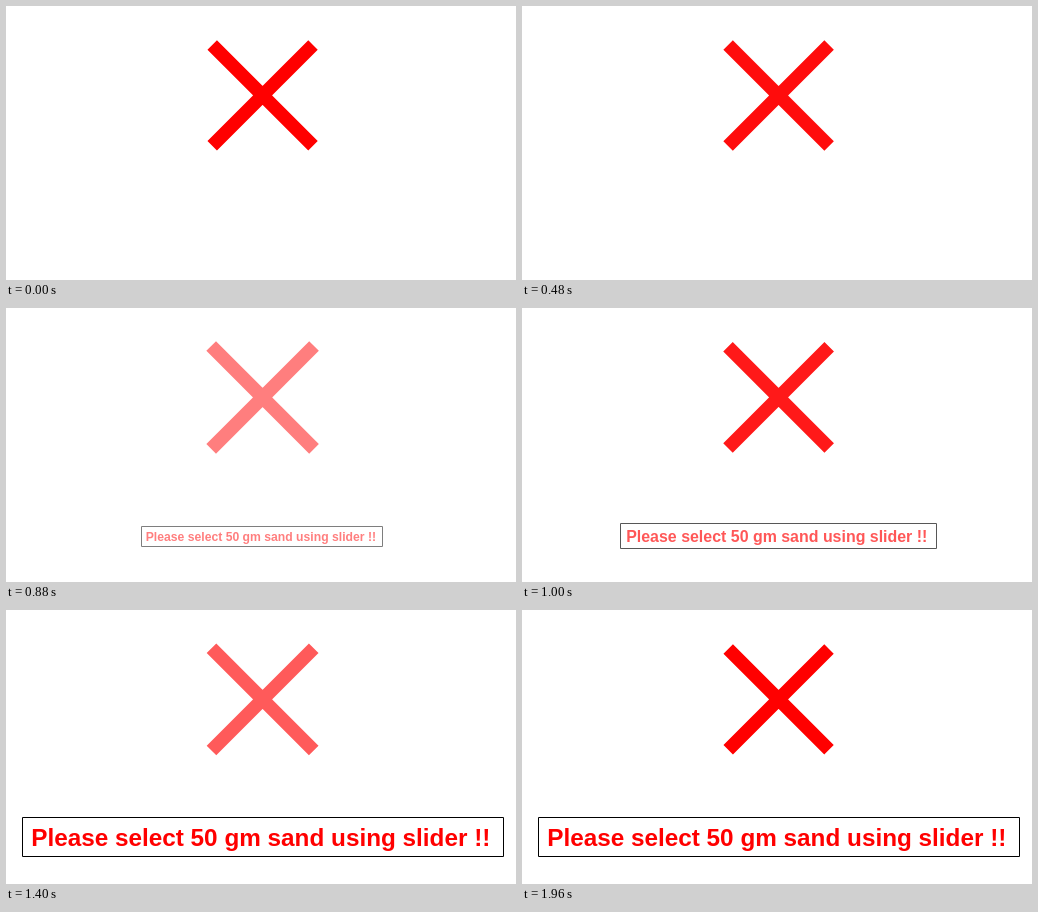
An HTML page that plays this animation: 510 by 274 pixels, repeating every 2000 ms.

```html
<!DOCTYPE html>
<html lang="en">
<head>
<meta charset="utf-8">
<title>Slider hint</title>
<style>
  html, body { margin: 0; width: 100%; height: 100%; overflow: hidden; background: #fff; }
  svg { display: block; }
  text { font: bold 24.3px "Liberation Sans", Arial, sans-serif; fill: #f00; }
</style>
</head>
<body>
<svg width="510" height="274" viewBox="0 0 510 274">
  <path id="cross" d="M-50.4-50.4 50.4 50.4M50.4-50.4-50.4 50.4" stroke="#f00" stroke-width="13.4"/>
  <g id="message">
    <path id="border" fill="none" stroke="#000"/>
    <text id="label" x="-231.8" y="9">Please select 50 gm sand using slider !!</text>
  </g>
</svg>
<script>
const LOOP = 2000, STEP = 40, PULSE = 500;
const ZOOM_START = 500, ZOOM_TIME = 793;
const [cross, message, border, label] =
  ["cross", "message", "border", "label"].map(id => document.getElementById(id));
const clamp = v => Math.max(0, Math.min(1, v));
const crisp = v => Math.floor(v) + 0.5;
const place = (el, x, y, s) => el.setAttribute("transform", `translate(${x} ${y}) scale(${s})`);

function drawCross(time) {
  const p = time % PULSE / PULSE;
  const nearEnd = Math.min(p, 1 - p);
  // Fades quickly to half, holds, then fades back; size rises and falls evenly.
  cross.setAttribute("opacity", 1 - 0.5 * clamp(nearEnd / 0.2));
  place(cross, 256.6, 89.4, 1 + 0.1 * nearEnd);
}

function drawMessage(time) {
  const s = clamp((time - ZOOM_START) / ZOOM_TIME);
  message.setAttribute("opacity", s);
  message.setAttribute("visibility", s > 0 ? "visible" : "hidden");
  const cx = 257 - 2 * (1 - s), cy = 227 + 3 * (1 - s);
  const left = crisp(cx - 240.5 * s), right = crisp(cx + 240.5 * s);
  const top = crisp(cy - 19.5 * s), bottom = crisp(cy + 19.5 * s);
  // The lower edge is lost while the box is tiny.
  const close = s > 0.3 ? "Z" : "";
  border.setAttribute("d", `M${left} ${bottom}V${top}H${right}V${bottom}${close}`);
  place(label, cx, cy, s);
}

function render(now) {
  const step = Math.floor(now % LOOP / STEP);
  const time = step * LOOP / (LOOP / STEP - 1);
  drawCross(time);
  drawMessage(time);
}

const start = performance.now();
function tick() {
  render(performance.now() - start);
  requestAnimationFrame(tick);
}
tick();
</script>
</body>
</html>
```
